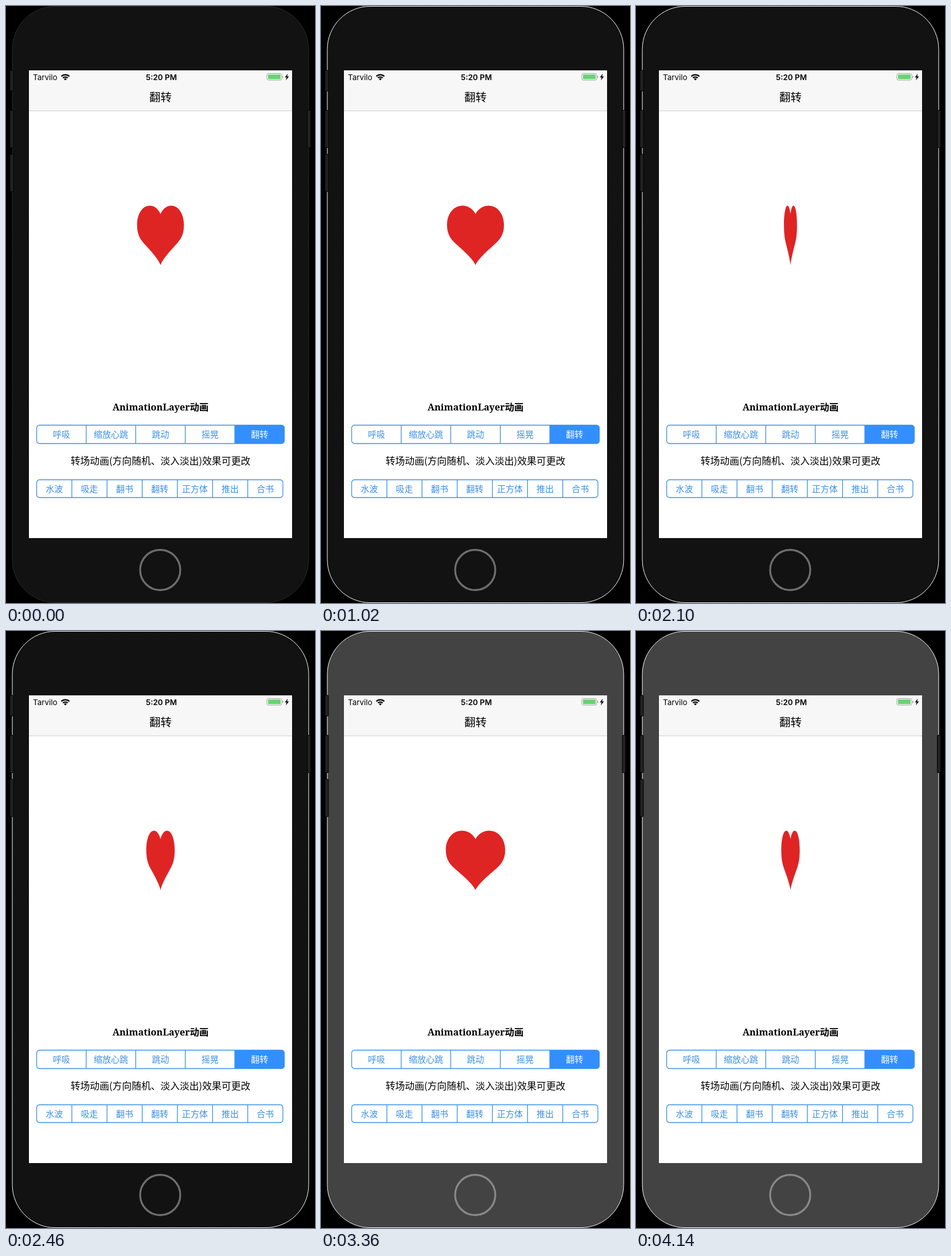
Animation of 539x1039 px, one loop 4200 ms. Source, as an HTML page:

```html
<!DOCTYPE html>
<html lang="zh-CN">
<head>
<meta charset="utf-8">
<title>翻转</title>
<style>
  html, body { margin: 0; width: 100%; height: 100%; overflow: hidden; background: #000; }
  svg { display: block; width: 539px; height: 1039px; }
  text { text-anchor: middle; font-family: "Noto Sans CJK SC", "Noto Sans CJK", sans-serif; }
  .status { font: 13.4px Inter, sans-serif; }
  .title { font-size: 19.5px; font-weight: 500; }
  .label { font-size: 16.8px; font-weight: 500; }
  .slab { font: 600 16.3px "Noto Serif", "Noto Sans CJK SC", "Noto Sans CJK", serif; }
  .segment { font-size: 15px; fill: #3a8fe6; }
  .control { fill: none; stroke: #3a8fe6; stroke-width: 1.3; }
  .keys rect { fill: #222; stroke: #000; }
</style>
</head>
<body>
<svg viewBox="0 0 539 1039">
  <defs>
    <pattern id="weave" width="4" height="4" patternUnits="userSpaceOnUse">
      <path fill="#131313" d="M0 0h4v4H0z"/>
      <path fill="#0b0b0b" d="M0 0h1v1H0zM2 2h1v1H2z"/>
    </pattern>
  </defs>
  <rect width="539" height="1039"/>
  <rect id="body" x="11" y=".5" width="517" height="1038" rx="75"/>
  <g class="keys">
    <rect x="7" y="112" width="6" height="36" rx="1"/>
    <rect x="7" y="181.500" width="6" height="65" rx="1"/>
    <rect x="7" y="258" width="6" height="65" rx="1"/>
    <rect x="525.500" y="181.500" width="6" height="65" rx="1"/>
  </g>
  <circle id="home" cx="269" cy="981.500" r="35" fill="none" stroke-width="3.3"/>

  <path fill="#fff" d="M40 112h459v814H40z"/>
  <path fill="#f7f7f7" d="M40 112h459v71H40z"/>
  <path stroke="#cfcfcf" d="M40 182.500h459"/>

  <text class="status" x="47" y="128.500" style="text-anchor:start">Tarvilo</text>
  <g fill="none" stroke="#000" stroke-width="2.300">
    <path d="M96.500 122.500a10 10 0 0 1 14 0M99.300 125.300a6 6 0 0 1 8.400 0"/>
    <path fill="#000" stroke="none" d="M103.500 129.500l-2.500-2.600a3.600 3.600 0 0 1 5 0z"/>
  </g>
  <text class="status" x="271" y="128.500" style="font-weight:600">5:20 PM</text>
  <rect x="455" y="117.500" width="26" height="11.500" rx="2.800" fill="none" stroke="#a4a4a4"/>
  <rect x="457" y="119.300" width="22" height="8" rx="1.200" fill="#66d470"/>
  <path fill="#a4a4a4" d="M482 121.300q1.500.4 1.500 2t-1.500 2z"/>
  <path d="M491.500 117.500l-5 6.700h3l-1.300 5.300 5.300-7h-3.200z"/>
  <text class="title" x="269.500" y="165.500">翻转</text>

  <path id="heart" fill="#df2424" d="M0 362C-.1 353-.26 347.500-.46 347.500C-.77 347.500-1 362-1 381C-1 398-.86 407-.62 417C-.42 426-.08 441 0 451C.08 441 .42 426 .62 417C.86 407 1 398 1 381C1 362 .77 347.500 .46 347.500C.26 347.500 .1 353 0 362Z"/>

  <text class="slab" x="269.500" y="703.500">AnimationLayer动画</text>
  <g id="layers"></g>
  <text class="label" x="269.500" y="798">转场动画(方向随机、淡入淡出)效果可更改</text>
  <g id="transitions"></g>
</svg>
<script>
  const byId = id => document.getElementById(id);
  const STEP = 60, LOOP = 4200, GREY_FROM = 3300;
  const CENTER = 269.5, HALF_WIDTH = 58;
  const START_ANGLE = 45.2, ANGLE_PER_STEP = 6.1;

  function segmented(id, labels, x, y, width, height, selected = -1) {
    const cell = width / labels.length;
    let html = '';
    if (selected >= 0) {
      const left = x + selected * cell, right = x + width;
      html += `<path fill="#338fff" d="M${left} ${y}H${right - 5}q5 0 5 5v${height - 10}q0 5-5 5H${left}z"/>`;
    }
    html += `<rect class="control" x="${x}" y="${y}" width="${width}" height="${height}" rx="5"/>`;
    labels.forEach((label, i) => {
      const left = x + i * cell;
      if (i) html += `<path class="control" d="M${left} ${y}v${height}"/>`;
      const color = i === selected ? ' style="fill:#fff"' : '';
      html += `<text class="segment" x="${left + cell / 2}" y="${y + height / 2 + 5.5}"${color}>${label}</text>`;
    });
    byId(id).innerHTML = html;
  }

  segmented('layers', ['呼吸', '缩放心跳', '跳动', '摇晃', '翻转'], 53.5, 729.5, 432, 32, 4);
  segmented('transitions', ['水波', '吸走', '翻书', '翻转', '正方体', '推出', '合书'], 53.5, 824.5, 429.5, 31);

  const heart = byId('heart'), body = byId('body'), home = byId('home');

  function draw(now) {
    const time = now % LOOP;
    const step = Math.floor(time / STEP);
    const angle = (START_ANGLE + ANGLE_PER_STEP * step) * Math.PI / 180;
    const grey = time >= GREY_FROM;
    heart.setAttribute('transform', `translate(${CENTER} 0) scale(${HALF_WIDTH * Math.cos(angle)} 1)`);
    body.setAttribute('fill', grey ? '#434343' : 'url(#weave)');
    body.setAttribute('stroke', step ? '#fff' : '#2a2a2a');
    home.setAttribute('stroke', grey ? '#888' : '#6e6e6e');
  }

  const start = performance.now();
  function tick() {
    draw(performance.now() - start);
    requestAnimationFrame(tick);
  }
  tick();
</script>
</body>
</html>
```
